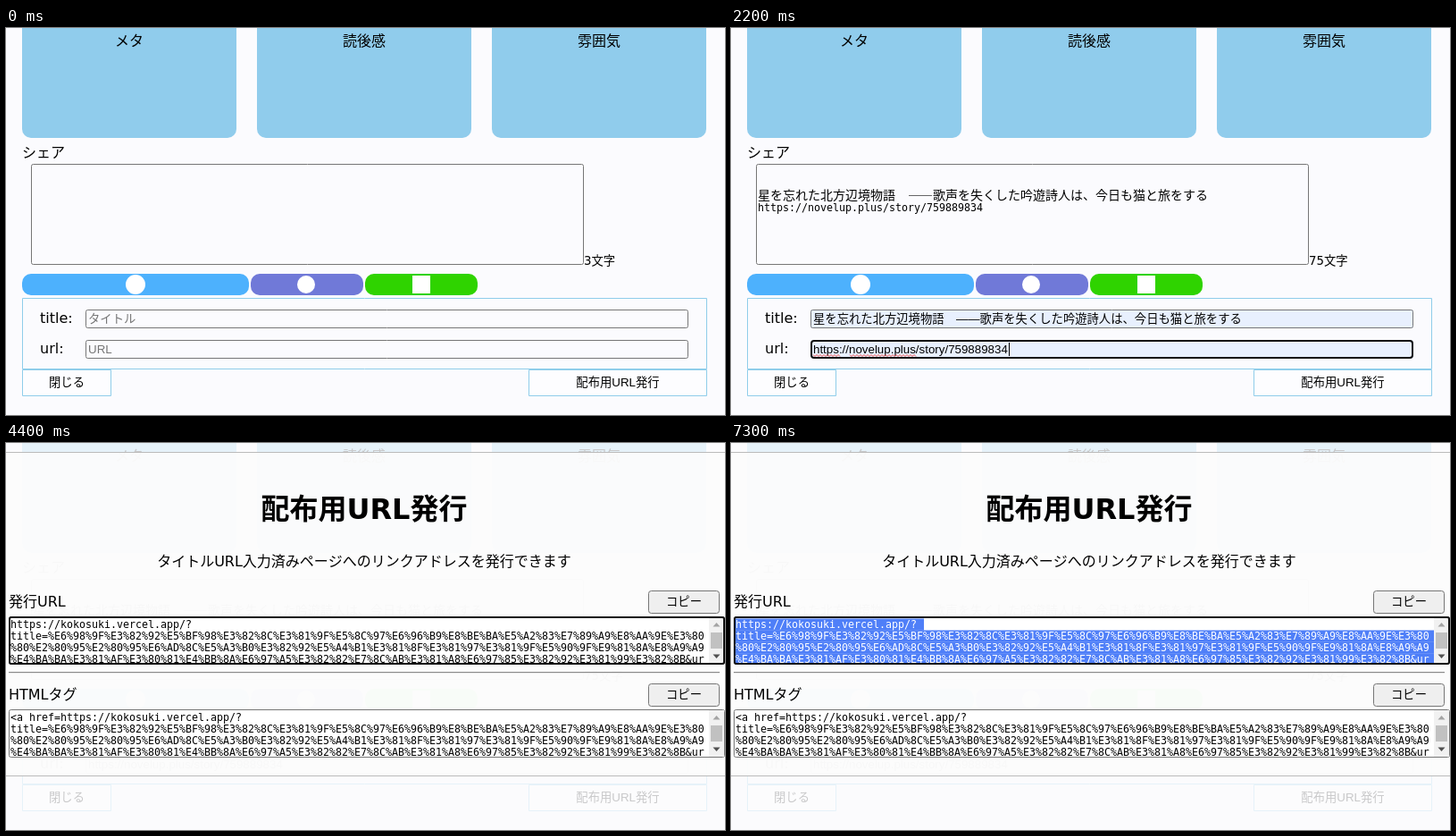
An HTML page with a canvas that plays this animation: 805x433 px, repeating every 8900 ms.

```html
<!DOCTYPE html>
<html lang="ja">
<head>
<meta charset="utf-8">
<title>配布用URL発行</title>
<style>
html, body { margin: 0; width: 100%; height: 100%; overflow: hidden; background: #fbfbfe; }
canvas { display: block; width: 805px; height: 433px; }
</style>
</head>
<body>
<canvas id="stage" width="805" height="433"></canvas>
<script>
const W = 805, H = 433, LOOP = 8900;
const page = document.getElementById('stage').getContext('2d');
const layer = Object.assign(document.createElement('canvas'), { width: W, height: H });
const popup = layer.getContext('2d');
let g = page;

const CJK = '"Noto Sans CJK JP", "Noto Sans CJK", sans-serif';
const BODY = '"DejaVu Sans", ' + CJK;
const FORM = '"Liberation Sans", ' + CJK;
const MONO = '"DejaVu Sans Mono", "Noto Sans CJK JP", monospace';
const DIALOG = '"Open Sans", ' + CJK;
const BG = '#fbfbfe', LINE = '#8fcdea', EDGE = '#767676', AUTOFILL = '#e8f0fe';
const SMALL = 13.333, CELL = 11.63;

const TITLE = '星を忘れた北方辺境物語　――歌声を失くした吟遊詩人は、今日も猫と旅をする';
const STORY = 'https://novelup.plus/story/759889834';
const SITE = 'https://kokosuki.vercel.app/?';
const CODE = encodeURIComponent(TITLE);
const QUERY = 'title=' + CODE + '&url=' + encodeURIComponent(STORY);
const COLS = 111;
const queryLines = [0, 1, 2].map(i => QUERY.slice(i * COLS, (i + 1) * COLS));

// Dialog text alternates between full lines and short remainders.
const dialogLines = [SITE, 'title=' + CODE.slice(0, 44), CODE.slice(44, 45)];
for (let at = 45, n = 48; at < 280; at += n, n = 80 - n) dialogLines.push(CODE.slice(at, at + n));

function fill(x, y, w, h, color, r = 0) {
  g.fillStyle = color;
  g.beginPath();
  g.roundRect(x, y, w, h, r);
  g.fill();
}

function frame(x, y, w, h, color, bg, r = 0, line = 1) {
  fill(x, y, w, h, bg, r);
  g.strokeStyle = color;
  g.lineWidth = line;
  g.beginPath();
  g.roundRect(x + line / 2, y + line / 2, w - line, h - line, r);
  g.stroke();
}

// cy is the visual middle of the line
function text(s, x, cy, size, font = BODY, color = '#000', align = 'left', weight = '') {
  g.font = `${weight} ${size}px ${font}`;
  g.fillStyle = color;
  g.textAlign = align;
  g.fillText(s, x, cy + size * 0.37);
}

function clipped(x, y, w, h, draw) {
  g.save();
  g.beginPath();
  g.rect(x, y, w, h);
  g.clip();
  draw();
  g.restore();
}

function arrow(x, y, dir, color, open) {
  g.beginPath();
  g.moveTo(x - 4, y - 2 * dir);
  g.lineTo(x, y + 2.5 * dir);
  g.lineTo(x + 4, y - 2 * dir);
  if (open) {
    g.strokeStyle = color;
    g.lineWidth = 2;
    g.stroke();
  } else {
    g.fillStyle = color;
    g.fill();
  }
}

function scrollbar(x, y, w, h, thumbY, thumbH, upColor, open) {
  fill(x, y, w, h, '#f1f1f1');
  fill(x + 2, thumbY, w - 4, thumbH, '#c1c1c1');
  arrow(x + w / 2, y + 8.5, -1, upColor, open);
  arrow(x + w / 2, y + h - 8.5, 1, '#505050', open);
}

function input(y, value, hint, focused) {
  const bg = value ? AUTOFILL : BG;
  if (focused) frame(89, y, 675, 21, '#101010', bg, 3, 2);
  else frame(89, y, 675, 21, EDGE, bg, 2);
  text(value || hint, 92, y + 10, SMALL, FORM, value ? '#000' : '#757575');
}

function squiggle(x0, x1) {
  g.strokeStyle = '#e84a4a';
  g.lineWidth = 1;
  g.beginPath();
  for (let x = x0, i = 0; x <= x1; x += 2, i++) g.lineTo(x, 365.5 + (i % 2) * 2);
  g.stroke();
}

function drawPage(t) {
  fill(0, 0, W, H, BG);
  ['メタ', '読後感', '雰囲気'].forEach((s, i) => {
    fill(18 + i * 263, -20, 240, 143, '#90ccec', 10);
    text(s, 138 + i * 263, 14, 16, BODY, '#000', 'center');
  });

  text('シェア', 18, 139, 16);
  frame(28, 152, 619, 113, EDGE, BG, 2);
  if (t >= 1000) text(TITLE, 30, 187, 14, CJK);
  if (t >= 1900) text(STORY, 30, 200.5, CELL, MONO);
  const count = t < 1000 ? 3 : t < 1900 ? 39 : 75;
  text(count + '文字', 647, 260, SMALL);

  fill(18, 275, 254, 24, '#4db1fd', 10);
  fill(274, 275, 126, 24, '#7079d8', 10);
  fill(402, 275, 126, 24, '#2fd300', 10);
  fill(134, 276, 22, 22, '#fff', 11);
  fill(326, 277, 20, 20, '#fff', 10);
  fill(455, 277, 20, 20, '#fff');

  frame(18, 302, 767, 80, LINE, BG);
  text('title:', 38, 324, 16);
  text('url:', 38, 358, 16);
  input(315, t >= 700 ? TITLE : '', 'タイトル', t >= 400 && t < 1200);
  input(349, t >= 1700 ? STORY : '', 'URL', t >= 1200 && t < 2800);
  if (t >= 1000 && t < 1500) fill(573, 318, 1, 14, '#000');
  if (t >= 1900 && t < 2800) {
    squiggle(92, 122);
    squiggle(133, 208);
    if (t < 2400) fill(311, 352, 1, 15, '#000');
  }

  frame(18, 382, 100, 30, LINE, '#fdfdff');
  frame(585, 382, 200, 30, LINE, '#fdfdff');
  text('閉じる', 68, 396.5, SMALL, FORM, '#000', 'center');
  text('配布用URL発行', 685, 396.5, SMALL, FORM, '#000', 'center');
}

function copyRow(label, y, first, state) {
  text(label, 3, y + 12, 16);
  frame(719, y, 80, 26, EDGE, state.hover ? '#e3e3e3' : '#efefef', 3);
  text('コピー', 759, y + 12.5, SMALL, FORM, '#000', 'center');

  const top = y + 29;
  frame(3, top, 802, 54, EDGE, '#fff', 2);
  clipped(4, top + 1, 800, 52, () => {
    [first, ...queryLines].forEach((s, i) => {
      const cy = top + 9 + i * 13;
      if (state.selected) fill(5, cy - 6.5, i ? 782 : 211, 13.2, '#4f7ff8');
      text(s, 5, cy, CELL, MONO, state.selected ? '#fff' : '#000');
    });
    scrollbar(787, top + 1, 17, 52, top + 18, 18, '#a3a3a3');
  });
  if (state.focused) {
    g.strokeStyle = '#101010';
    g.lineWidth = 2;
    g.beginPath();
    g.roundRect(4, top + 1, 800, 52, 2);
    g.stroke();
  }
}

function drawPopup(t, dy) {
  g.clearRect(0, 0, W, H);
  fill(0, 0, W, H, 'rgba(252,252,253,.8)');
  g.save();
  g.translate(0, dy);
  fill(0, 10, W, 363, 'rgba(252,252,252,.92)');
  fill(0, 10, W, 1, '#bbb');
  fill(0, 372, W, 1, '#bbb');
  text('配布用URL発行', 401, 73, 32, BODY, '#000', 'center', 'bold');
  text('タイトルURL入力済みページへのリンクアドレスを発行できます', 401, 132.5, 16, BODY, '#000', 'center');
  const selected = t >= 6600;
  copyRow('発行URL', 165, SITE, {
    selected,
    focused: selected || (t >= 4400 && t < 4600),
    hover: t >= 6600 && t < 7200
  });
  fill(3, 256, 796, 1, '#8a8a8a');
  fill(3, 257, 796, 1, '#e6e6e6');
  copyRow('HTMLタグ', 269, '<a href=' + SITE, {});
  g.restore();
}

function drawDialog(t) {
  g.save();
  g.shadowColor = 'rgba(0,0,0,.4)';
  g.shadowBlur = 7;
  g.shadowOffsetY = 1;
  fill(185, -10, 448, 308, '#fdfdfd', 2);
  g.restore();
  g.strokeStyle = '#aaa';
  g.lineWidth = 1;
  g.strokeRect(184.5, -10.5, 449, 309);

  text('kokosuki.vercel.app の内容', 201, 23, 14, DIALOG, '#202124');
  clipped(186, 40, 430, 195, () => {
    g.letterSpacing = '-1.5px';
    text('コピーしました', 201, 52.5, 11, DIALOG, '#5f6368');
    g.letterSpacing = '0px';
    dialogLines.forEach((s, i) => text(s, 201, 72 + i * 20, 12.5, DIALOG, '#5f6368'));
  });
  scrollbar(617, 42, 16, 192, 59, 117, '#505050', true);
  fill(185, 235, 448, 1, '#ececec');
  fill(553, 250, 64, 32, t >= 5900 ? '#4b7adb' : '#5183e9', 3);
  text('OK', 584, 266, 12, DIALOG, '#fff', 'center', 'bold');
}

function render(t) {
  g = page;
  drawPage(t);
  if (t >= 3000) {
    const step = Math.min(2, (t - 3000) / 100);
    g = popup;
    drawPopup(t, [-19, -7, 0][step]);
    page.globalAlpha = [0.27, 0.68, 1][step];
    page.drawImage(layer, 0, 0);
    page.globalAlpha = 1;
  }
  if (t >= 4800 && t < 6500) {
    g = popup;
    g.clearRect(0, 0, W, H);
    drawDialog(t);
    page.globalAlpha = t < 4900 || t >= 6400 ? 0.5 : 1;
    page.drawImage(layer, 0, 0);
    page.globalAlpha = 1;
  }
}

const start = performance.now();
function tick() {
  const t = (performance.now() - start) % LOOP;
  render(Math.floor(t / 100) * 100);
  requestAnimationFrame(tick);
}
tick();
</script>
</body>
</html>
```
